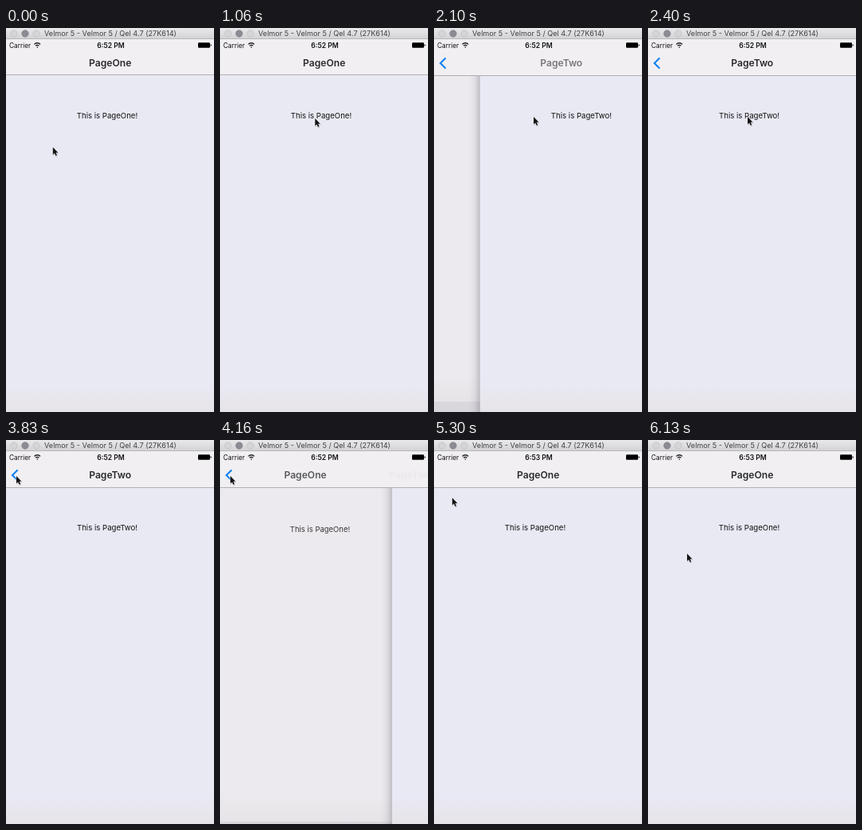
Animation of 261x480 px, one loop 6160 ms. Source, as an HTML page:

```html
<!DOCTYPE html>
<html lang="en">
<head>
<meta charset="utf-8">
<title>Page navigation</title>
<style>
html, body { margin: 0; width: 100%; height: 100%; overflow: hidden; background: #e9e9f4; }
svg { display: block; width: 100vw; height: 100vh; }
text { font-family: Inter, Roboto, "Liberation Sans", sans-serif; fill: #111; }
.mid { text-anchor: middle; }
.head { font-size: 12.1px; font-weight: 600; fill: #2a2a2c; }
.body { font-size: 9.6px; }
</style>
</head>
<body>
<svg viewBox="0 0 261 480">
  <defs>
    <linearGradient id="bar" x2="0" y2="1">
      <stop stop-color="#e9e8ea"/><stop offset="1" stop-color="#d2d1d3"/>
    </linearGradient>
    <linearGradient id="foot" x2="0" y2="1">
      <stop stop-color="#e7e4e8" stop-opacity="0"/><stop offset="1" stop-color="#e7e4e8"/>
    </linearGradient>
    <linearGradient id="shade">
      <stop stop-color="#504c5c" stop-opacity="0"/>
      <stop offset=".5" stop-color="#504c5c" stop-opacity=".07"/>
      <stop offset="1" stop-color="#504c5c" stop-opacity=".28"/>
    </linearGradient>
    <path id="arrow" d="M0 0V9.2L2.1 7.4 3.6 10.8 5.2 10.1 3.7 6.8H6.5Z"/>
  </defs>

  <rect width="261" height="480" fill="#d9d7dc"/>
  <g id="pageOne">
    <rect id="paper" width="261" height="480"/>
    <rect y="446" width="261" height="34" fill="url(#foot)"/>
    <text id="textOne" class="body mid" x="127" y="113">This is PageOne!</text>
  </g>
  <g id="pageTwo">
    <rect x="-14" width="14" height="480" fill="url(#shade)"/>
    <rect width="261" height="480" fill="#e9e9f4"/>
    <rect y="446" width="261" height="34" fill="url(#foot)"/>
    <text class="body mid" x="127" y="113">This is PageTwo!</text>
  </g>

  <rect y="14" width="261" height="45" fill="#f1eff2"/>
  <rect id="rule" width="261" height="1" fill="#b0afb3"/>
  <text id="headOne" class="head mid" x="130.7" y="48">PageOne</text>
  <text id="headTwo" class="head mid" x="130.7" y="48">PageTwo</text>
  <path id="back" d="M14.6 37.5 8 44l6.6 6.5" fill="none" stroke="#0a7ff5" stroke-width="2"/>

  <text x="4" y="24.6" font-size="8.3">Carrier</text>
  <g fill="none" stroke="#111" stroke-width="1.3">
    <path d="M35.5 20.4a5.2 5.2 0 0 1 7.6 0M37.2 22.3a2.9 2.9 0 0 1 4.2 0"/>
    <circle cx="39.3" cy="24" r=".5" fill="#111" stroke-width=".5"/>
  </g>
  <text id="clock" class="mid" x="131.5" y="24.7" font-size="8.6" font-weight="600"></text>
  <rect x="241" y="18.2" width="15" height="6.6" rx="1.2"/>
  <path d="M256.6 20.3q1.3.2 1.3 1.2t-1.3 1.2z"/>

  <rect width="261" height="14" fill="url(#bar)"/>
  <rect y="13" width="261" height="1" fill="#b8b7ba"/>
  <g fill="#d5d4d7" stroke="#bfbec2" stroke-width=".7">
    <circle cx="10" cy="7" r="4.2"/>
    <circle cx="24" cy="7" r="4.2" fill="#8d8a93" stroke="#827f88"/>
    <circle cx="38" cy="7" r="4.2"/>
  </g>
  <text x="48" y="10.4" font-size="9.13" style="fill:#414043">Velmor 5 - Velmor 5 / Qel 4.7 (27K614)</text>

  <g id="cursor">
    <use href="#arrow" x=".5" y="1" fill="#555" stroke="#555" opacity=".25"/>
    <use href="#arrow" fill="#151515" stroke="#f6f5f8" stroke-width=".8" paint-order="stroke"/>
  </g>
</svg>
<script>
const LOOP = 6160;
const PUSH = 1815, POP = 3845, SLIDE = 600, MINUTE = 4600;

// start, end, and the pointer tip reached at the end
const moves = [
  [460, 1060, 119.3, 113],
  [1100, 1330, 125, 111],
  [2760, 3360, 13, 45],
  [5030, 5630, 36, 108.5],
  [5660, 6130, 49, 142]
];

const $ = id => document.getElementById(id);
const clamp = v => Math.min(1, Math.max(0, v));
const smooth = v => v * v * (3 - 2 * v);
const mix = (a, b, k) => a + (b - a) * k;

// cubic-bezier(.25, .1, .25, 1)
function ease(t) {
  if (t <= 0 || t >= 1) return clamp(t);
  let lo = 0, hi = 1, s = .5;
  for (let i = 0; i < 24; i++) {
    s = (lo + hi) / 2;
    if (.75 * s * (1 - s) + s ** 3 < t) lo = s; else hi = s;
  }
  return .3 * s * (1 - s) ** 2 + 3 * s * s * (1 - s) + s ** 3;
}

function shift(id, x, opacity) {
  $(id).setAttribute("transform", `translate(${x} 0)`);
  $(id).setAttribute("opacity", clamp(opacity));
}

function pointer(t) {
  let x = 58.8, y = 149;
  for (const [from, to, nx, ny] of moves) {
    const k = smooth(clamp((t - from) / (to - from)));
    x = mix(x, nx, k);
    y = mix(y, ny, k);
  }
  return `translate(${x} ${y})`;
}

function draw(t) {
  const p = ease((t - PUSH) / SLIDE) - ease((t - POP) / SLIDE);
  const scale = 1 - .07 * p;
  const tint = clamp(p * 6);

  $("pageOne").setAttribute("transform",
    `translate(${130.5 - 9 * p} 240) scale(${scale}) translate(-130.5 -240)`);
  $("paper").setAttribute("fill",
    `rgb(${mix(233, 236, tint)},${mix(233, 234, tint)},${mix(244, 238, tint)})`);
  // keep the left side covered while the page shrinks
  $("paper").setAttribute("x", -20 * tint);
  $("paper").setAttribute("width", 261 + 40 * tint);
  $("textOne").setAttribute("opacity", Math.max(.3, 1 - p));

  shift("pageTwo", 261 * (1 - p), p > 0 ? 1 : 0);
  shift("headOne", -137 * p, 1 - 1.4 * p);
  shift("headTwo", 131 * (1 - p), p * p);
  $("back").setAttribute("opacity", tint);
  // the bar settles one pixel lower once a page has been pushed
  $("rule").setAttribute("y", t < PUSH ? 58 : 59);
  $("clock").textContent = t < MINUTE ? "6:52 PM" : "6:53 PM";
  $("cursor").setAttribute("transform", pointer(t));
}

const start = performance.now();
function tick() {
  draw((performance.now() - start) % LOOP);
  requestAnimationFrame(tick);
}
tick();
</script>
</body>
</html>
```
